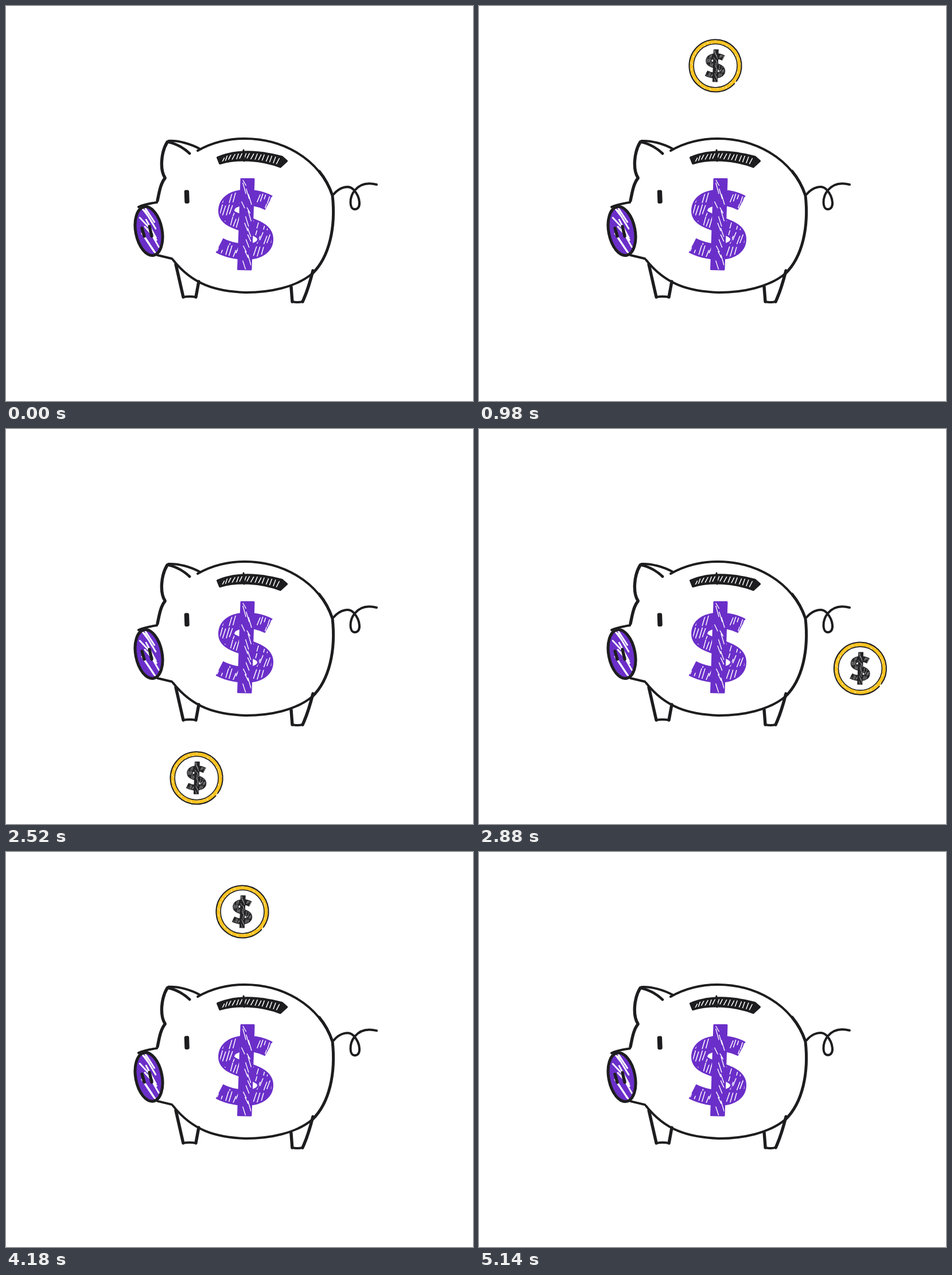
An HTML page that plays this animation: 814 by 688 pixels, repeating every 5500 ms.

```html
<!DOCTYPE html>
<html lang="en">
<head>
<meta charset="utf-8">
<title>Piggy bank</title>
<style>
  html, body { margin: 0; width: 100%; height: 100%; overflow: hidden; background: #fff; }
  svg { display: block; }
  .ink { fill: none; stroke: #1d1d1f; stroke-width: 4; stroke-linecap: round; stroke-linejoin: round; }
  .bold { stroke-width: 5.4; }
  .streaks { fill: none; stroke: #fff; stroke-linecap: round; }
</style>
</head>
<body>
<svg width="814" height="688" viewBox="0 0 814 688">
  <defs>
    <path id="ess" d="M458 343C430 328 384 330 384 357C384 382 452 378 452 406C452 432 405 434 372 417"/>
    <path id="bar" d="M410 301.500L432 301.500L427 459L404.500 458.500Z"/>
    <path id="slotLine" d="M378 268C400 259 440 258 480 272"/>
    <path id="slotShape" d="M369 264C400 251 440 252 481 263L489 270L478 280C445 267 402 265 373 274Z"/>
    <ellipse id="nose" cx="249" cy="392" rx="23" ry="43" transform="rotate(-11 249 392)"/>
    <clipPath id="noseClip"><use href="#nose"/></clipPath>
    <clipPath id="barClip"><use href="#bar"/></clipPath>
    <clipPath id="slotClip"><use href="#slotShape"/></clipPath>
    <mask id="essMask" maskUnits="userSpaceOnUse" x="350" y="290" width="130" height="180">
      <use href="#ess" fill="none" stroke="#fff" stroke-width="22"/>
    </mask>
    <g id="dollar">
      <use href="#ess" fill="none" stroke="currentColor" stroke-width="28"/>
      <g mask="url(#essMask)"><path id="essStreaks" class="streaks" stroke-width="1.500"/></g>
      <use href="#bar" fill="currentColor" stroke="currentColor" stroke-width="3" stroke-linejoin="round"/>
      <g clip-path="url(#barClip)"><path id="barStreaks" class="streaks" stroke-width="1.400"/></g>
    </g>
  </defs>

  <g id="coin">
    <circle r="45" fill="#fff"/>
    <circle r="41.800" fill="none" stroke="#fdc321" stroke-width="7.400"/>
    <path id="flecks" class="streaks" stroke-width=".9"/>
    <circle class="ink" r="38" style="stroke-width:1.600"/>
    <circle class="ink" r="45.600" style="stroke-width:2" pathLength="360" stroke-dasharray="353 7" transform="rotate(43)"/>
    <use href="#dollar" color="#242426" transform="scale(.355) translate(-417.500 -380.500)"/>
  </g>

  <g id="pig">
    <path fill="#fff" d="M281 236C300 234 322 240 338 249C362 236 390 231 416 231C478 231 544 262 569 330C574 400 560 440 535 465L517 515H499L497 489C460 500 390 503 336 482L331 507H309L296 450L289 440L264 434L231 350L263 342L277 299C268 285 270 255 281 236Z"/>
    <path class="ink" d="M334 252C362 236 390 231 416 231C478 231 544 262 569 330"/>
    <path class="ink bold" style="stroke-width:5" d="M546 288C556 300 564 315 569 330C575 385 564 437 534 466"/>
    <path class="ink" d="M534 466C505 490 460 499 418 499C365 497 325 485 291 442"/>
    <path class="ink bold" d="M277 299C268 285 270 255 281 237M277 300C269 310 267 325 264 339"/>
    <path class="ink" d="M283 235C300 234 322 240 338 249"/>
    <path class="ink" style="stroke-width:4.600" d="M283 237C298 240 312 249 320 257"/>
    <path class="ink" d="M263 342C250 344 240 346 231 350M264 434L289 440"/>
    <path class="ink bold" d="M296 450L309 507M331 507L336 480M497 489L499 515M517 515C524 500 529 485 535 461"/>
    <path class="ink" d="M309 507Q320 505 331 507M499 515Q508 517 517 515"/>
    <path class="ink" d="M571 328C582 315 598 311 606 320C618 333 620 354 608 354C598 354 598 333 608 321C617 310 630 307 646 311"/>

    <use href="#nose" fill="#6b2fc9"/>
    <g clip-path="url(#noseClip)"><path id="noseStreaks" class="streaks" stroke-width="2.800"/></g>
    <use href="#nose" class="ink" style="stroke-width:5"/>
    <path class="ink bold" d="M237 387L241 401M250 384L254 401"/>
    <rect x="311" y="320.500" width="8.400" height="23.500" rx="3" fill="#1d1d1f" transform="rotate(-2 315 332)"/>

    <use href="#slotShape" fill="#1d1d1f"/>
    <g clip-path="url(#slotClip)"><path id="slotStreaks" class="streaks" stroke-width="1.500"/></g>
    <use href="#slotShape" class="ink"/>
    <path class="ink" style="stroke-width:3" d="M414 251L415 270"/>
    <use href="#dollar" color="#6b2fc9"/>
  </g>
</svg>
<script>
const $ = id => document.getElementById(id);
const LOOP = 5500, STEP = 20;

let seed = 7;
const rnd = () => (seed = seed * 16807 % 2147483647) / 2147483647;
const wob = a => (rnd() - 0.5) * 2 * a;
const dash = (x, y, dx, dy) =>
  `M${(x - dx).toFixed(1)} ${(y - dy).toFixed(1)}L${(x + dx).toFixed(1)} ${(y + dy).toFixed(1)}`;
const repeat = (n, make) => Array.from({ length: n }, (_, i) => make(i)).join('');

// Rows of slanted pen gaps, some left out
function hatchEss() {
  let d = '';
  for (let y = 332; y < 445; y += 24)
    for (let x = 368; x < 470; x += 6)
      if (rnd() < 0.8) d += dash(x + wob(0.8), y + wob(4), -2.6, 8 + wob(2));
  return d;
}

function hatchSlot() {
  const line = $('slotLine'), end = line.getTotalLength();
  return repeat(16, i => {
    const p = line.getPointAtLength(i / 16 * end);
    return dash(p.x, p.y + wob(2), -2.5, 6 + wob(1.5));
  });
}

const hatchBar = () => repeat(16, i => dash(418 + wob(8), 308 + i * 9.6, 2.6, 7 + wob(3)));
const hatchNose = () => repeat(10, i => dash(249 + wob(10), 356 + i * 8, 9 + wob(2), 14 + wob(3)));
const coinFlecks = () => repeat(34, i => {
  const a = i / 34 * 2 * Math.PI + wob(0.08), r = 41.5 + wob(3.2);
  return dash(r * Math.cos(a), r * Math.sin(a), 0.5, 1);
});

$('essStreaks').setAttribute('d', hatchEss());
$('barStreaks').setAttribute('d', hatchBar());
$('slotStreaks').setAttribute('d', hatchSlot());
$('noseStreaks').setAttribute('d', hatchNose());
$('flecks').setAttribute('d', coinFlecks());

const ease = u => (1 - Math.cos(Math.PI * u)) / 2;

// Keyframes [time, value], eased in and out between neighbours
function track(keys, t) {
  if (t <= keys[0][0]) return keys[0][1];
  for (let i = 1; i < keys.length; i++) {
    const [t0, a] = keys[i - 1], [t1, b] = keys[i];
    if (t < t1) return a + (b - a) * ease((t - t0) / (t1 - t0));
  }
  return keys[keys.length - 1][1];
}

const wobble = t0 => [[t0, 0], [t0 + 333, 8.6], [t0 + 667, -16.8], [t0 + 988, 0]];
const TILT = [...wobble(-8), ...wobble(4164)];
const ORBIT = [[1552, 0], [3620, 2 * Math.PI]];
const RADIUS = [[650, 60], [980, 258.3], [4180, 258.3], [4510, 60]];

function draw(t) {
  const a = track(ORBIT, t), r = track(RADIUS, t);
  const x = 412 - r * Math.sin(a), y = 362.3 - r * Math.cos(a);
  $('coin').setAttribute('transform', `translate(${x.toFixed(2)} ${y.toFixed(2)})`);
  $('pig').setAttribute('transform', `rotate(${track(TILT, t).toFixed(3)} 435 373.5)`);
}

function frame() {
  const t = (performance.now() + 1) % LOOP;
  draw(t - t % STEP);
  requestAnimationFrame(frame);
}
frame();
</script>
</body>
</html>
```
